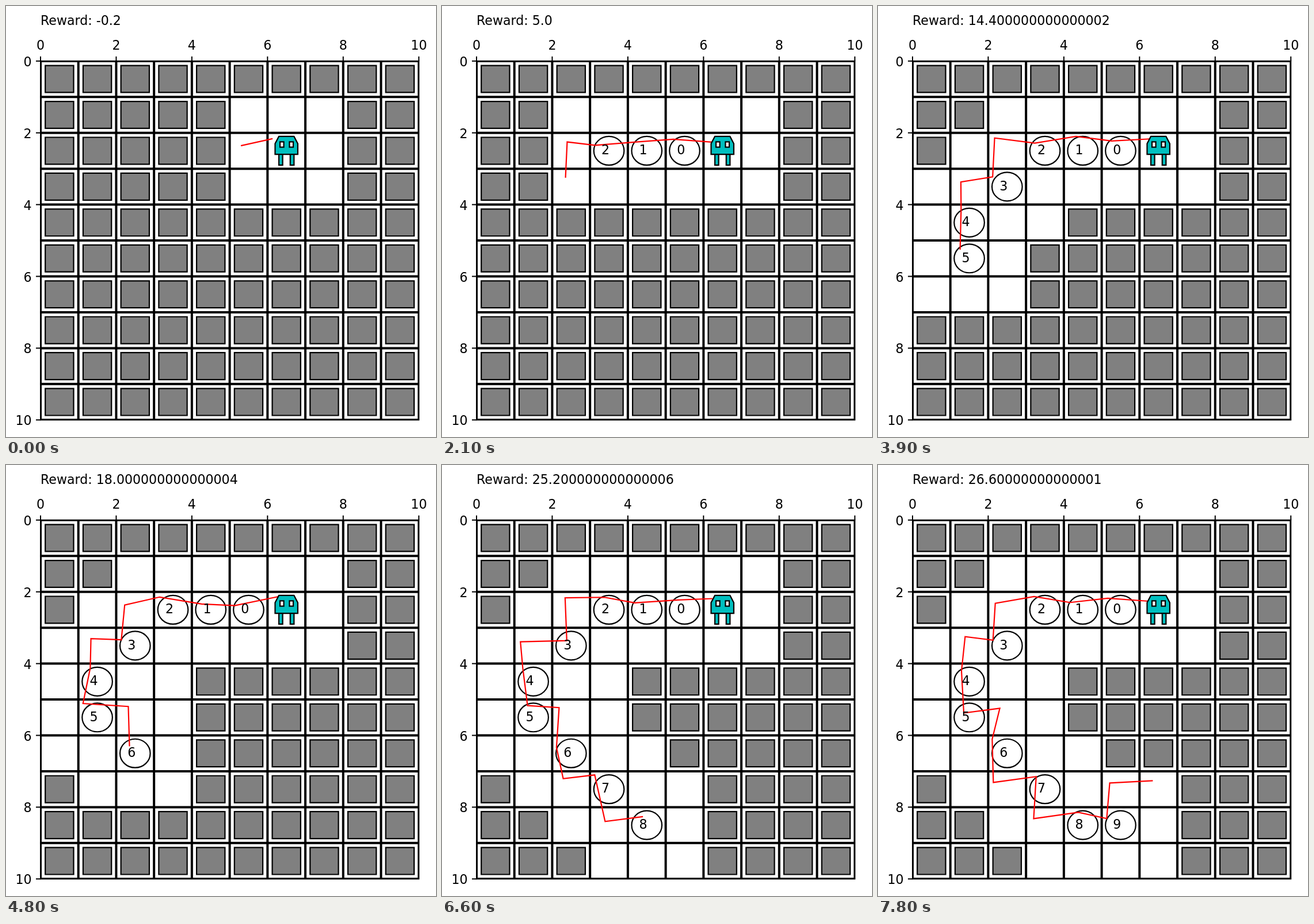
Animation of 747 by 750 pixels, one loop 8000 ms. Source, as an HTML page with a canvas:

```html
<!DOCTYPE html>
<html lang="en">
<head>
<meta charset="utf-8">
<title>Grid exploration</title>
<style>
  html, body { margin: 0; width: 100%; height: 100%; overflow: hidden; background: #fff; }
  canvas { display: block; }
</style>
</head>
<body>
<canvas id="stage" width="747" height="750"></canvas>
<script>
const ctx = document.getElementById('stage').getContext('2d');
const LOOP = 8000, STEP = 300, N = 10;
const X0 = 60, Y0 = 95.8, W = 65.72, H = 62.45;
const px = x => X0 + x * W;
const py = y => Y0 + y * H;

// One action per step: a move, or * to place a beacon
const ACTIONS = 'l*l*l*ld*ld*d*rd*dr*dr*r*ur';
const MOVES = { l: [-1, 0], r: [1, 0], u: [0, -1], d: [0, 1] };

// Seeded position within a cell, from 0.1 to 0.4
function wobble(step, i) {
  const v = Math.sin(step * 127.1 + i * 311.7 + 4.2) * 43758.5453;
  return 0.1 + 0.3 * (v - Math.floor(v));
}

// Opens the 3x3 block around a cell and returns how many cells were new
function reveal(open, [cx, cy]) {
  const before = open.size;
  for (let y = cy - 1; y <= cy + 1; y++)
    for (let x = cx - 1; x <= cx + 1; x++) open.add(y * N + x);
  return open.size - before;
}

function buildStates() {
  const path = [[6, 2]], beacons = [], open = new Set();
  let reward = 0;
  reveal(open, path[0]);
  return [...ACTIONS].map(action => {
    const head = path[path.length - 1];
    if (action === '*') {
      beacons.push(head);
      reward += reveal(open, head) - 1;
    } else {
      const [dx, dy] = MOVES[action];
      path.push([head[0] + dx, head[1] + dy]);
      reward -= 0.2;
    }
    return { path: [...path], beacons: [...beacons], open: new Set(open), reward };
  });
}
const states = buildStates();

// Full float precision, always with a decimal point
const showFloat = v => Number.isInteger(v) ? v.toFixed(1) : String(v);

function text(str, x, y, align = 'left') {
  ctx.fillStyle = '#000';
  ctx.textAlign = align;
  ctx.fillText(str, x, y);
}

function line(x1, y1, x2, y2) {
  ctx.beginPath();
  ctx.moveTo(x1, y1);
  ctx.lineTo(x2, y2);
  ctx.stroke();
}

// Filled, outlined box in cell units
function box(x, y, w, h, fill) {
  ctx.fillStyle = fill;
  ctx.beginPath();
  ctx.rect(px(x), py(y), w * W, h * H);
  ctx.fill();
  ctx.stroke();
}

function drawGrid(open) {
  const [l, t, r, b] = [px(0), py(0), px(N), py(N)];
  ctx.save();
  ctx.beginPath();
  ctx.rect(l, t, r - l, b - t);
  ctx.clip();
  ctx.lineWidth = 4;
  for (let i = 0; i <= N; i++) {
    line(px(i), t, px(i), b);
    line(l, py(i), r, py(i));
  }
  ctx.restore();

  ctx.lineWidth = 2;
  ctx.strokeRect(l, t, r - l, b - t);
  for (let i = 0; i <= N; i += 2) {
    line(px(i), t, px(i), t - 8);
    line(l, py(i), l - 8, py(i));
    text(i, px(i), 75.5, 'center');
    text(i, 44.5, py(i) + 9, 'right');
  }
  ctx.lineWidth = 2.2;
  for (let y = 0; y < N; y++)
    for (let x = 0; x < N; x++)
      if (!open.has(y * N + x)) box(x + 0.125, y + 0.125, 0.75, 0.75, '#808080');
}

function drawBeacons(beacons) {
  ctx.fillStyle = '#fff';
  for (const [x, y] of beacons) {
    ctx.beginPath();
    ctx.ellipse(px(x + 0.5), py(y + 0.5), 0.4 * W, 0.4 * H, 0, 0, Math.PI * 2);
    ctx.fill();
    ctx.stroke();
  }
}

function drawTrail(path, step) {
  ctx.beginPath();
  path.forEach(([x, y], i) =>
    ctx.lineTo(px(x + wobble(step, 2 * i)), py(y + wobble(step, 2 * i + 1))));
  ctx.strokeStyle = '#f00';
  ctx.stroke();
  ctx.strokeStyle = '#000';
}

function drawRobot(x, y) {
  const body = '#00bfbf';
  ctx.beginPath();
  for (const [dx, dy] of [[.2, .6], [.2, .3], [.3, .1], [.7, .1], [.8, .3], [.8, .6]])
    ctx.lineTo(px(x + dx), py(y + dy));
  ctx.closePath();
  ctx.fillStyle = body;
  ctx.fill();
  ctx.stroke();
  for (const dx of [0.3, 0.6]) box(x + dx, y + 0.6, 0.1, 0.3, body);
  for (const dx of [0.33, 0.58]) box(x + dx, y + 0.25, 0.1, 0.15, '#fff');
}

function draw(step) {
  const { path, beacons, open, reward } = states[step];
  ctx.fillStyle = '#fff';
  ctx.fillRect(0, 0, 747, 750);
  ctx.font = '22.1px "DejaVu Sans", sans-serif';
  ctx.strokeStyle = '#000';
  text('Reward: ' + showFloat(reward), 60, 33);
  drawGrid(open);
  drawBeacons(beacons);
  drawTrail(path, step);
  drawRobot(6, 2);
  beacons.forEach(([x, y], i) => text(i, px(x + 0.3), py(y + 0.6)));
}

function tick() {
  draw(Math.floor((performance.now() % LOOP) / STEP));
  requestAnimationFrame(tick);
}
tick();
</script>
</body>
</html>
```
